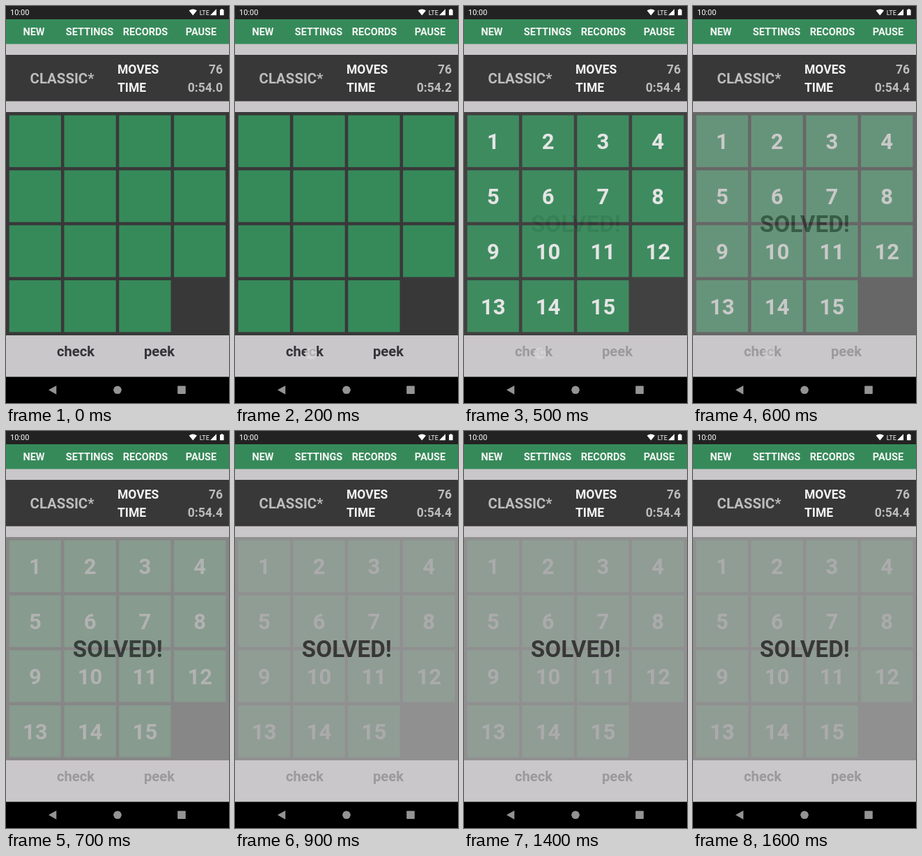
These frames come from a looping animation (320 px wide and 569 px high, 1700 ms). An HTML page:

```html
<!DOCTYPE html>
<html lang="en">
<head>
<meta charset="utf-8">
<title>Sliding puzzle</title>
<style>
  html, body { margin: 0; width: 100%; height: 100%; overflow: hidden; background: #000; }
  svg { position: absolute; left: 0; top: 0; display: block; }
  text, .time { font-family: Roboto, sans-serif; font-weight: 700; }
  .mid { text-anchor: middle; }
  .end { text-anchor: end; }
  .menu { font-size: 14.5px; fill: #f4f6f4; }
  .info { font-size: 17.5px; fill: #f4f4f4; }
  .info.end { fill: #bdbdbd; }
  .num { font-size: 31px; fill: #ececec; }
  .btn { font-size: 20.2px; }

  .time { position: absolute; right: 9px; top: 107px; font-size: 17.5px; line-height: 20px; color: #bdbdbd; }
  .time::after { content: "0:54.0"; animation: tick 1.7s step-end infinite; }
  #nums, .btn, .fade, .touch { animation: 1.7s step-end infinite; }
  #nums { animation-name: reveal; }
  .btn { animation-name: disable; }
  .fade { animation-name: fade; }
  .touch { animation-name: touch; }

  /* 5.88% is one 100 ms step */
  @keyframes tick {
    0% { content: "0:54.0"; }
    5.88% { content: "0:54.1"; }
    11.76% { content: "0:54.2"; }
    17.64% { content: "0:54.3"; }
    23.52%, 100% { content: "0:54.4"; }
  }
  @keyframes reveal {
    0% { opacity: 0; }
    29.4%, 100% { opacity: 1; }
  }
  @keyframes disable {
    0% { fill: #353338; }
    29.4%, 100% { fill: #9b999c; }
  }
  @keyframes fade {
    0% { opacity: 0; }
    29.4% { opacity: .1; }
    35.28% { opacity: .54; }
    41.16% { opacity: .9; }
    47.04%, 100% { opacity: 1; }
  }
  @keyframes touch {
    0% { opacity: 0; }
    11.76% { opacity: .75; }
    35.28% { opacity: .4; }
    41.16%, 100% { opacity: 0; }
  }
</style>
</head>
<body>
<svg width="320" height="569" viewBox="0 0 320 569">
  <rect width="320" height="569" fill="#cac7ca"/>

  <!-- status bar -->
  <rect width="320" height="19" fill="#222"/>
  <g fill="#fff">
    <text x="6" y="13.3" font-size="11" style="font-weight:400">10:00</text>
    <path d="M262.6 6.6Q268.3 2.6 274 6.6L268.3 13.4Z"/>
    <text x="277.7" y="12.6" font-size="9" style="font-weight:400">LTE</text>
    <path d="M302 4.2V13.2H293Z"/>
    <path d="M307 5.2H308.6V4.2H311V5.2H312.6V13.3H307Z"/>
  </g>

  <rect y="19" width="320" height="35.5" fill="#368a5a"/>
  <g class="menu mid">
    <text x="40" y="42">NEW</text>
    <text x="120" y="42">SETTINGS</text>
    <text x="200" y="42">RECORDS</text>
    <text x="280" y="42">PAUSE</text>
  </g>

  <!-- score panel -->
  <rect y="70" width="320" height="66.5" fill="#393839"/>
  <text class="mid" x="80.5" y="111" font-size="20.4" fill="#bdbdbd">CLASSIC*</text>
  <text class="info" x="160" y="96.5">MOVES</text>
  <text class="info" x="160" y="123.3">TIME</text>
  <text class="info end" x="311" y="96.5">76</text>

  <!-- board -->
  <rect y="152" width="320" height="320" fill="#393839"/>
  <g id="tiles" fill="#368a5a"></g>
  <g id="nums" class="num mid"></g>
  <g class="fade">
    <rect y="152" width="320" height="320" fill="#a0a0a0" fill-opacity=".85"/>
    <text class="mid" x="160.3" y="324" font-size="33.2" fill="#383738">SOLVED!</text>
  </g>

  <text class="btn mid" x="100" y="501.5">check</text>
  <text class="btn mid" x="220" y="501.5">peek</text>
  <circle class="touch" cx="109" cy="498" r="8.5" fill="#d9d7d9"/>

  <!-- navigation bar -->
  <rect y="531.5" width="320" height="38" fill="#000"/>
  <g fill="#949494">
    <path d="M61 550.3L72.3 543.9V556.7Z"/>
    <circle cx="160" cy="550.3" r="5.8"/>
    <rect x="246.2" y="544.5" width="11.6" height="11.6" rx=".8"/>
  </g>
</svg>
<div class="time"></div>
<script>
  const PITCH = 78.8, SIZE = 74.2;

  function add(parent, tag, attrs) {
    const el = document.createElementNS("http://www.w3.org/2000/svg", tag);
    for (const key in attrs) el.setAttribute(key, attrs[key]);
    return document.getElementById(parent).appendChild(el);
  }

  for (let i = 0; i < 15; i++) {
    const x = 4.7 + (i % 4) * PITCH;
    const y = 156.7 + Math.floor(i / 4) * PITCH;
    add("tiles", "rect", { x, y, width: SIZE, height: SIZE });
    add("nums", "text", { x: x + SIZE / 2, y: y + 48.6 }).textContent = i + 1;
  }
</script>
</body>
</html>
```
